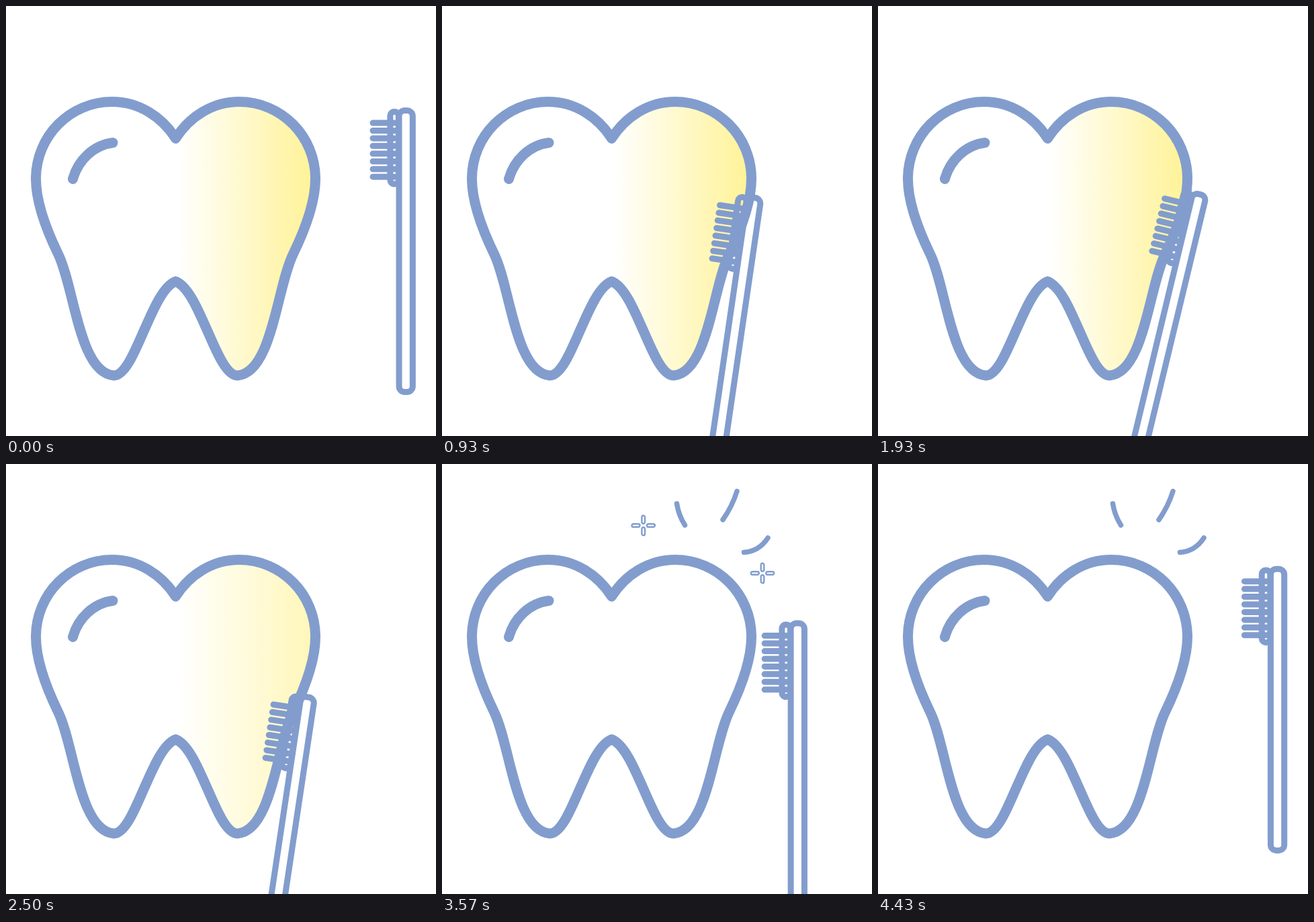
These frames come from a looping animation (640 px wide and 640 px high, 5.78 s). An HTML page:

```html
<!DOCTYPE html>
<html lang="en">
<head>
<meta charset="utf-8">
<title>Tooth brushing</title>
<style>
  html, body { margin: 0; width: 100%; height: 100%; overflow: hidden; background: #fff; }
  svg { display: block; width: 100%; height: 100%; }
  .ink { fill: none; stroke: #829dcd; stroke-linecap: round; stroke-linejoin: round; }
</style>
</head>
<body>
<svg viewBox="0 0 640 640">
  <defs>
    <linearGradient id="stain" gradientUnits="userSpaceOnUse" x1="255" x2="447">
      <stop offset="0" stop-color="#fff"/>
      <stop offset="1" stop-color="#fff39c"/>
    </linearGradient>
    <path id="half" d="M252.5 197C273 165 307 142.5 347 142.5C410 142.5 460.5 194 460.5 257
      C460.5 292 445 333 427 370C403 420 396 546 344.5 550C313 550 289 423 252.5 410"/>
    <g id="spark" stroke-width="2.4">
      <rect x="-2.3" y="-14.7" width="4.6" height="12" rx="2.3"/>
      <rect x="-2.3" y="2.7" width="4.6" height="12" rx="2.3"/>
      <rect x="-17.2" y="-2.3" width="12" height="4.6" rx="2.3"/>
      <rect x="5.2" y="-2.3" width="12" height="4.6" rx="2.3"/>
    </g>
  </defs>

  <use id="yellow" href="#half" fill="url(#stain)"/>
  <g class="ink" stroke-width="15">
    <use href="#half"/>
    <use href="#half" transform="matrix(-1 0 0 1 505 0)"/>
    <path d="M99.5 257.5C107 230 130 207 159 203.5"/>
  </g>

  <!-- Brush, drawn relative to the tip of its top bristle -->
  <g id="brush" class="ink" stroke-width="9">
    <path id="bristles"/>
    <rect x="25.8" y="-16.7" width="12.5" height="107.7" rx="6"/>
    <rect x="39" y="-18.5" width="20.3" height="419" rx="8.5"/>
  </g>

  <path id="rays" class="ink" stroke-width="7.5"
    d="M349.5 59Q352 76 361.5 91M439 40.5Q432 63 418 83M449.5 131.5Q472 130 485 110"/>
  <g id="sparks" class="ink">
    <use href="#spark" x="299.7" y="91.5"/>
    <use href="#spark" x="477" y="162.5"/>
  </g>
</svg>
<script>
  const LOOP = 5780, END = 4430, STEP = 1000 / 14;
  const $ = id => document.getElementById(id);

  // time, x, y of the brush
  const strokes = [
    [0, 546, 174], [500, 425.5, 244], [640, 421.3, 259], [1210, 406, 333],
    [1360, 394.5, 352], [1895, 428.3, 282.5], [2500, 398, 358],
    [3140, 445, 299], [4000, 515, 212.5], [END, 545.5, 174.5]
  ];

  const ramp = (t, from, to) => Math.min(1, Math.max(0, (t - from) / (to - from)));

  function position(t) {
    const i = Math.max(1, strokes.findIndex(k => k[0] >= t));
    const [t0, x0, y0] = strokes[i - 1], [t1, x1, y1] = strokes[i];
    const p = ramp(t, t0, t1);
    return [x0 + (x1 - x0) * p, y0 + (y1 - y0) * p];
  }

  const tilt = t => t < 1360
    ? 18.5 * (t / 1360) ** 2.1
    : Math.max(0, 18.5 - 0.00875 * (t - 1360));

  $('bristles').setAttribute('d',
    Array.from({ length: 8 }, (_, i) => `M0 ${i * 11.45}h32`).join(''));

  function draw(now) {
    // The motion advances 14 times a second, then rests
    const t = Math.min(END, Math.floor((now % LOOP) / STEP + 0.15) * STEP);
    const [x, y] = position(t);
    const shine = ramp(t, 2640, 3140);
    $('brush').setAttribute('transform', `translate(${x} ${y}) rotate(${tilt(t)})`);
    $('yellow').setAttribute('opacity', 1 - ramp(t, 2200, 3130));
    $('rays').setAttribute('opacity', shine);
    $('sparks').setAttribute('opacity', shine * (1 - ramp(t, 3860, 4420)));
  }

  const start = performance.now();
  function tick() {
    draw(performance.now() - start);
    requestAnimationFrame(tick);
  }
  tick();
</script>
</body>
</html>
```
